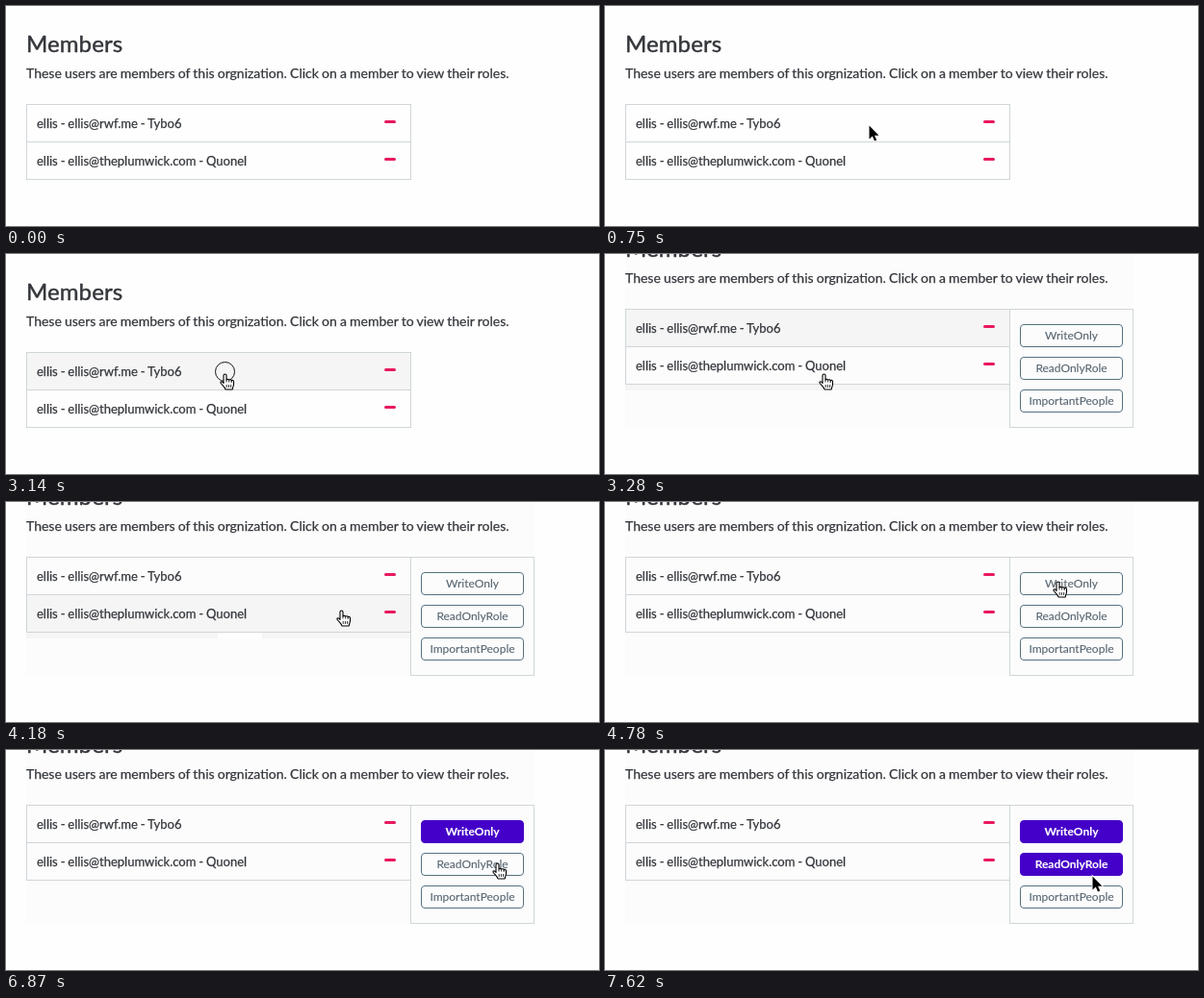
An HTML page that plays this animation: 616x229 px, repeating every 8 s.

```html
<!DOCTYPE html>
<html lang="en">
<head>
<meta charset="utf-8">
<title>Members</title>
<style>
  html, body { margin: 0; width: 100%; height: 100%; overflow: hidden; background: #fefefe; }
  body {
    position: relative; font-family: Lato, sans-serif; color: #33363b;
    word-spacing: -.43px; -webkit-text-stroke: .25px;
  }
  body *, .row::after { position: absolute; box-sizing: border-box; }
  h1, p { margin: 0; left: 21px; white-space: nowrap; font-weight: 400; }
  h1 { top: 25px; font-size: 24px; line-height: 28px; letter-spacing: .1px; -webkit-text-stroke: .45px; }
  p { top: 60px; font-size: 14px; line-height: 20px; }

  /* Every change is a hard cut on one 8 s clock */
  .page, .panel, .tint, .row, .button, .stale, .gap, .pointer, .arrow, .hand, .ring {
    animation: 8s step-end infinite;
  }

  .tint { left: 21px; top: 0; width: 528px; height: 181px; background: #fcfcfc; visibility: hidden; animation-name: opened; }
  .page { left: 0; top: 0; width: 616px; height: 229px; animation-name: scroll; }

  .list { left: 21px; top: 102px; width: 400px; height: 79px; border: 1px solid #cfd6d9; }
  .row { left: 0; width: 398px; height: 38px; padding-left: 10px; font-size: 13px; line-height: 38px; white-space: nowrap; }
  .row::after { content: ""; left: 371px; top: 16px; width: 12px; height: 3px; border-radius: 1.5px; background: #e9185f; }
  .first { top: 0; animation-name: hover-first; }
  .second { top: 39px; animation-name: hover-second; }
  .rule { left: 0; top: 38px; width: 398px; height: 1px; background: #cfd6d9; }

  .panel { left: 420px; top: 102px; width: 129px; height: 124px; border: 1px solid #cfd6d9; visibility: hidden; animation-name: opened; }
  .button {
    left: 10px; width: 107px; height: 24px; border: 1px solid #58707f; border-radius: 4px;
    font-size: 12px; line-height: 22px; text-align: center; color: #55636f; -webkit-text-stroke: .1px;
  }
  .write { top: 15px; animation-name: pick-write; }
  .read { top: 49px; animation-name: pick-read; }
  .people { top: 83px; }

  .stale { left: 21px; top: 136px; width: 399px; height: 6px; background: #f5f5f5; visibility: hidden; animation-name: stale; }
  .gap { left: 199px; top: 0; width: 46px; height: 6px; background: #fefefe; visibility: hidden; animation-name: gap; }

  svg { overflow: visible; }
  .pointer { left: 0; top: 0; transform: translate(-60px, -60px); animation-name: travel; }
  .arrow { left: 0; top: 0; width: 11px; height: 17px; animation-name: arrow; }
  .hand { left: -5px; top: 0; width: 16px; height: 18px; visibility: hidden; animation-name: hand; }
  .ring { left: 0; top: 0; width: 21px; height: 21px; border: 1px solid #111; border-radius: 50%; visibility: hidden; animation-name: press; }

  @keyframes scroll { 41%, 100% { transform: translateY(-45px); } }
  @keyframes opened { 41%, 100% { visibility: visible; } }
  @keyframes hover-first {
    28% { background: #f5f5f5; }
    42.875%, 100% { background: transparent; }
  }
  @keyframes hover-second {
    42.875% { background: #f5f5f5; }
    57.875%, 100% { background: transparent; }
  }
  @keyframes stale {
    41% { visibility: visible; }
    57.875%, 100% { visibility: hidden; }
  }
  @keyframes gap {
    46.625% { visibility: visible; }
    57.875%, 100% { visibility: hidden; }
  }
  @keyframes pick-write {
    80.25%, 100% { background: #4400c8; border-color: #4400c8; color: #fff; font-weight: 700; }
  }
  @keyframes pick-read {
    89.625%, 100% { background: #4400c8; border-color: #4400c8; color: #fff; font-weight: 700; }
  }
  @keyframes arrow {
    28% { visibility: hidden; }
    95.25%, 100% { visibility: visible; }
  }
  @keyframes hand {
    28% { visibility: visible; }
    95.25%, 100% { visibility: hidden; }
  }
  @keyframes press {
    26.25% { visibility: visible; transform: translate(266px, 113px); }
    28% { visibility: hidden; }
    39.25% { visibility: visible; transform: translate(217px, 112px); }
    41%, 100% { visibility: hidden; }
  }
  @keyframes travel {
    3.75% { transform: translate(426px, 171px); }
    5.625% { transform: translate(376px, 155px); }
    7.5% { transform: translate(305px, 134px); }
    9.375% { transform: translate(274px, 124px); }
    28% { transform: translate(262px, 124px); }
    29.875% { transform: translate(240px, 124px); }
    31.75% { transform: translate(226px, 124px); }
    35.5% { transform: translate(228px, 125px); }
    37.375% { transform: translate(227px, 124px); }
    46.625% { transform: translate(256px, 120px); }
    48.5% { transform: translate(350px, 112px); }
    52.25% { transform: translate(348px, 112px); }
    56% { transform: translate(370px, 108px); }
    57.875% { transform: translate(425px, 96px); }
    59.75% { transform: translate(470px, 82px); }
    61.5% { transform: translate(490px, 77px); }
    65.25% { transform: translate(487px, 76px); }
    67.125% { transform: translate(493px, 77px); }
    70.875% { transform: translate(492px, 87px); }
    82.125% { transform: translate(495px, 95px); }
    84% { transform: translate(503px, 108px); }
    85.875% { transform: translate(510px, 117px); }
    95.25%, 100% { transform: translate(506px, 131px); }
  }
</style>
</head>
<body>
  <div class="tint"></div>
  <div class="stale"><div class="gap"></div></div>

  <div class="page">
    <h1>Members</h1>
    <p>These users are members of this orgnization. Click on a member to view their roles.</p>
    <div class="list">
      <div class="row first">ellis - ellis@rwf.me - Tybo6</div>
      <div class="rule"></div>
      <div class="row second">ellis - ellis@theplumwick.com - Quonel</div>
    </div>
    <div class="panel">
      <div class="button write">WriteOnly</div>
      <div class="button read">ReadOnlyRole</div>
      <div class="button people">ImportantPeople</div>
    </div>
  </div>

  <div class="ring"></div>
  <div class="pointer">
    <svg class="arrow" viewBox="0 0 11 17">
      <path d="M.5 .5V14.5L3.8 11.5L6 16.6L8.2 15.6L6 10.7H10.5Z" fill="#000" stroke="#fff" stroke-width="1.6" paint-order="stroke"/>
    </svg>
    <svg class="hand" viewBox="0 -.5 16 18">
      <path d="M4 10V2a1.5 1.5 0 0 1 3 0V6.5a1.4 1.2 0 0 1 2.6 .3a1.4 1.2 0 0 1 2.6 .6a1.3 1.3 0 0 1 2.3 1V11c0 2-1 3-1.3 5.5H6C5.5 14 3 12.5 1.2 10c-.8-1.3 .6-2.3 1.6-1.4Z" fill="#fff" stroke="#000" stroke-width="1.1" stroke-linejoin="round"/>
      <path d="M7 6.5V9M9.6 7V9M12.2 7.5V9.5M7.2 11.5V14.5M9.4 11.5V14.5M11.6 11.5V14.5" fill="none" stroke="#000" stroke-width=".8"/>
    </svg>
  </div>
</body>
</html>
```
